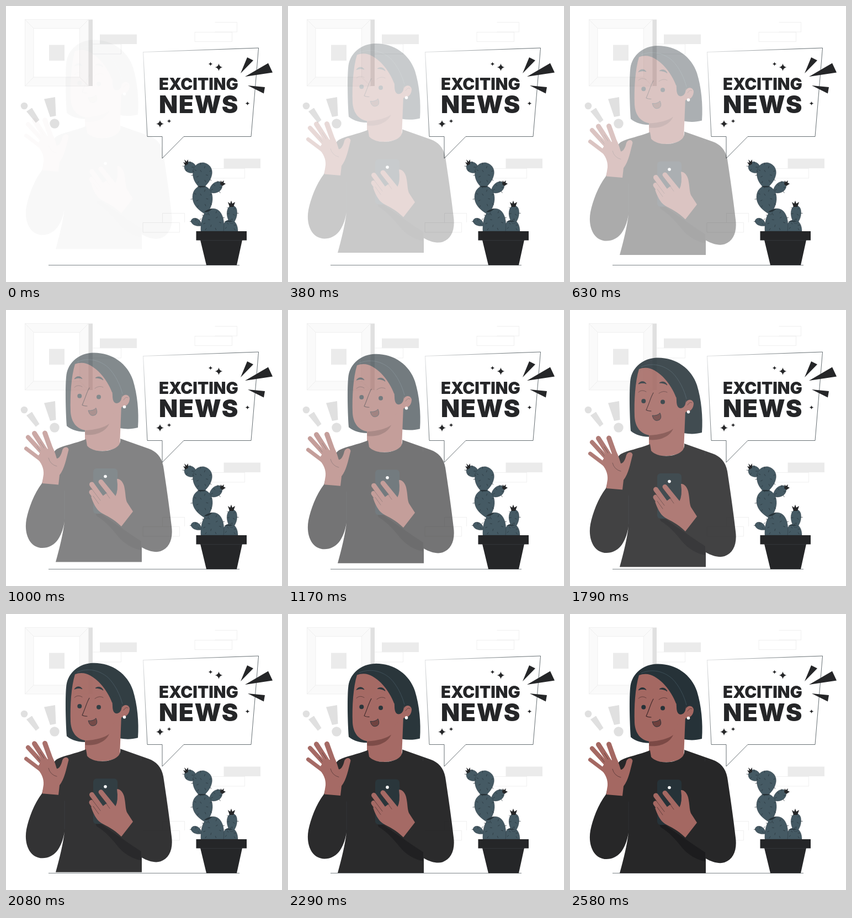
Write an HTML page that moves like this. It is 500x500 px and loops after 2.62 s.

```html
<!DOCTYPE html>
<html lang="en">
<head>
<meta charset="utf-8">
<title>Exciting news</title>
<style>
  html, body { margin: 0; width: 100%; height: 100%; overflow: hidden; background: #fff; }
  svg { display: block; width: 100%; height: 100%; }
  text { font-family: Inter, sans-serif; font-weight: 900; fill: #252628; }
  .line { fill: none; stroke: #e6e6e6; stroke-width: .6; }
  .pale { fill: #ebebeb; }
  .mark { fill: #e0e0e0; }
  .ink { fill: #252628; }
  .hair { fill: #263238; }
  .skin { fill: #a46862; }
  .finger { fill: none; stroke: #a46862; stroke-linecap: round; }
  .crease { fill: none; stroke: #3b2628; stroke-width: .6; stroke-linecap: round; }
  .pad { fill: #455a64; stroke: #263238; stroke-width: .4; }
</style>
</head>
<body>
<svg viewBox="0 0 500 500">
  <defs>
    <radialGradient id="fade" gradientUnits="userSpaceOnUse" cx="250" cy="85" r="160">
      <stop offset="0" stop-color="#263238" stop-opacity=".2"/>
      <stop offset="1" stop-color="#263238"/>
    </radialGradient>
  </defs>

  <!-- wall -->
  <path class="line" d="M142 69H208.500V87H142zM342 47.500H409.500V64.500H342zM378.500 29.500H418.500V47H378.500M366 294.500H432.500V312H366zM283.500 392V375.500H323.500V392M248 392.500H314.500V410H248z"/>
  <path class="pale" d="M170 51.500h67V69h-67zM394.500 276.500H461V294h-66.500z"/>
  <path class="mark" d="M149 24.500h8V145h-8z"/>
  <path d="M34.500 24.500H149.500V145H34.500z" fill="#fafafa" stroke="#ebebeb" stroke-width=".7"/>
  <path d="M50 40.500h83.500V129H50z" fill="#fff" stroke="#ebebeb" stroke-width=".7"/>
  <path class="line" d="M34.500 24.500L50 40.500M149.500 24.500L133.500 40.500M34.500 145L50 129M149.500 145L133.500 129"/>
  <path class="pale" d="M78 70.500h28V99H78z"/>
  <g class="mark">
    <circle cx="33" cy="181" r="6.300"/>
    <path d="M37 191L47 184.500L60.500 206.500L54 211.500zM69 168.500L89 165L90.500 199L80 201z"/>
    <circle cx="88" cy="213" r="8.700"/>
  </g>
  <path d="M77 469.500H423" stroke="#263238" stroke-width=".6"/>

  <!-- speech bubble -->
  <path d="M248.500 83.500L457.500 76L444 236.500H322L283 276V236.500H256z" fill="#fff" stroke="url(#fade)" stroke-width=".7"/>
  <text x="277" y="151.500" font-size="29.500">EXCITING</text>
  <text x="277" y="194" font-size="44.500" letter-spacing="1.500">NEWS</text>
  <path class="ink" d="M437 93L448 98.500L425 122zM475 103.500L483 120.500L433 128zM438 144L469 147L467 158.500z"/>
  <g id="stars" class="ink"></g>

  <!-- cactus -->
  <g id="cactus">
    <path class="pad" d="M392 408C391 396 397 387 406 387.500C416 388 420 398 420 408z"/>
    <path class="pad" d="M407 394C400 386 398 373 403 365C408 359 416 361 418 369C420 379 416 389 411 394z"/>
    <path class="pad" d="M354 398C346 400 337 397 335 390C336 384 343 383 348 386C352 389 354 392 354 398z"/>
    <path class="pad" d="M353 408C352 388 358 367 375 367C391 367 397 387 394 408z"/>
    <path class="pad" d="M368 335C370 324 378 317 387 318C394 321 393 331 386 336C379 340 371 340 368 335z"/>
    <path class="pad" d="M363 378C350 371 338 361 338 346C338 333 347 325 357 326C368 327 375 338 374 351C373 363 368 368 365 378z"/>
    <path class="pad" d="M344 297C341 304 332 304 326 299C320 292 324 284 332 282C341 283 346 290 344 297z"/>
    <path class="pad" d="M349 327C341 319 337 309 339 298C341 288 349 283 359 284C371 287 376 298 372 309C369 319 363 323 360 328z"/>
    <path class="hair" d="M346 327Q354 330 363 327Q354 325 346 327zM359 373Q366 375 374 367Q365 368 359 373zM395 391Q402 387 412 391Q402 390 395 391z"/>
    <path class="ink" d="M325 289L321 283L325 284L323 278L327 282L330 278L330 286zM388 323L389 316L391 319L395 316L394 320L398 322L392 326zM405 364L402 355L406 358L408 352.500L410 358L415 355L412 364z"/>
    <path id="spikes" fill="none" stroke="#263238" stroke-width=".7"/>
    <path class="ink" d="M344.500 408H436V424.500H344.500zM352 424H428L418 469.500H363z"/>
    <path d="M352 424.700H428" stroke="#43474b" stroke-width=".5"/>
  </g>

  <g id="woman">
    <path class="hair" d="M110 223C108 195 107 150 109.500 130C113 108 132 91 158 90.500C192 90 220 110 230 140C238 166 241 197 239 226C228 229 217 229 206 227L150 234C132 234 119 231 110 223z"/>
    <path class="skin" d="M143 226L143 262Q175 276 206 260L209 185L180 190z"/>
    <path class="skin" d="M125 111C118 134 116 168 117 197C118 216 128 229 145 231C170 230 186 220 195 200L211 188L210 165L192 162C184 140 163 113 141 109Q132 108 125 111z"/>
    <path class="skin" d="M209 174C211 165 222 164 224 173C224 182 218 189 210 188z"/>
    <path class="crease" d="M213 176Q217 169 221 172"/>
    <path class="hair" d="M188 150Q193 158 193 168C193 176 195 182 201 182C208 181 210 174 210 166L222 155z"/>
    <path d="M129 107C148 99 169 103 185 117C198 130 207 149 211 165" fill="none" stroke="#455a64" stroke-width=".7"/>
    <circle cx="214.500" cy="188.500" r="2.800" fill="#fff"/>
    <path d="M143.500 231C163 230 178 226 187 219C181 233 164 241 143.500 239z" fill="#7b4945"/>
    <path class="hair" d="M124 138C127 132 135 132 138 137.500C133 135.500 129 136 124 138zM162 136C167 132 174 134 176 140C172 137 167 136 162 136z" stroke="#263238" stroke-width=".8"/>
    <path class="crease" d="M124 153Q130 147 138 152M161 155Q169 149 176 153"/>
    <circle class="hair" cx="133.300" cy="168.800" r="4"/>
    <circle class="hair" cx="168" cy="170.500" r="4"/>
    <path class="crease" d="M151 154C146 162 143 175 138 185Q141 187 147 187" style="stroke-width:1.100"/>
    <path d="M149 195Q158 196 163 190.500Q167 199 162 203Q152 208 149 195z" fill="#6d403d" stroke="#263238" stroke-width=".9"/>

    <path fill="#272728" d="M145 247C125 255 105 258 92 265C84 271 78 285 72 302L65 327C51 345 41 372 37 392C32 420 44 444 66 444C87 444 101 427 106 396C104 415 97 445 90 469.500H246V443C258 450 271 453 280 450C296 444 303 428 300 405C297 378 291 335 285 296C282 279 272 269 258 264L207 246C208 252 205 258 202 260C190 271 158 272 147 259z"/>
    <path d="M160 374C177 385 203 404 245 432V448C230 446 213 436 202 422C190 407 180 396 164 386z" fill="#1c1c1e"/>
    <path d="M244.500 260V267M106 340V392" stroke="#35383a" stroke-width=".6"/>

    <path class="finger" stroke-width="7" d="M36.500 264L63 284"/>
    <path class="finger" stroke-width="8" d="M40 243.500L67 273"/>
    <path class="finger" stroke-width="9" d="M51.500 236.500L73 270M70.500 236L82 268"/>
    <path class="skin" d="M56 281C64 290 69 300 68 311L65.500 327L95 329.500L97 312C106 301 109 283 113.500 266C112 259 104 261 102 267C100 276 96 282 92 282C89 272 87 266 84 261L63 270z"/>
    <path class="crease" d="M77 281Q80 293 92 296M62 268L56 260M69 263L62 252"/>

    <rect class="hair" x="158" y="300" width="44" height="82" rx="6"/>
    <circle cx="180" cy="314.500" r="2.800" fill="#fff"/>
    <path class="finger" stroke-width="9" d="M172 324.500L196 354M155.500 329L180 363M155 343L174 370"/>
    <path class="skin" d="M201 319C206 318 212 324 214 332C217 345 216 354 219 361L230 378L209 405C195 391 182 386 172 380C163 374 158 363 154 351L171 353L182 345L198 351Q204 340 201 319z"/>
    <path class="crease" d="M167 325L188 354M153 334L171 358M158 350L168 364"/>
  </g>
</svg>
<script>
const LOOP = 2620, STEPS = 63, RISE = 30;
const byId = id => document.getElementById(id);
const woman = byId('woman');

const star = (x, y, r) =>
  `<path d="M${x} ${y - r}Q${x + r * .15} ${y - r * .15} ${x + r} ${y}` +
  `Q${x + r * .15} ${y + r * .15} ${x} ${y + r}Q${x - r * .15} ${y + r * .15} ${x - r} ${y}` +
  `Q${x - r * .15} ${y - r * .15} ${x} ${y - r}z"/>`;
byId('stars').innerHTML = [[385.5, 111, 6.8], [370.5, 105, 3.8], [279, 213.5, 6.8],
  [295.5, 208.5, 3.8], [437.5, 176.5, 3.8]].map(s => star(...s)).join('');

// Short thorns scattered over each pad by the golden angle: x, y, rx, ry, count
byId('spikes').setAttribute('d', [[356, 304, 17, 19, 11], [356, 347, 18, 20, 11],
  [374, 388, 20, 18, 11], [333, 292, 10, 9, 5], [381, 328, 11, 9, 5],
  [409, 375, 9, 13, 6], [406, 397, 12, 8, 5], [344, 391, 9, 6, 4]]
  .map(([x, y, rx, ry, count]) => Array.from({ length: count }, (_, i) => {
    const a = i * 2.4 + x, r = Math.sqrt((i + .5) / count);
    const dx = Math.cos(a), dy = Math.sin(a);
    return `M${x + rx * r * dx} ${y + ry * r * dy}l${dx * 4} ${dy * 4}`;
  }).join('')).join(''));

// cubic-bezier(0, 0, .58, 1)
function easeOut(x) {
  let lo = 0, hi = 1;
  for (let i = 0; i < 24; i++) {
    const s = (lo + hi) / 2;
    if (s * s * (1.74 - .74 * s) < x) lo = s; else hi = s;
  }
  return lo * lo * (3 - 2 * lo);
}

function draw(now) {
  const t = now % LOOP;
  const step = t < 80 ? 0 : Math.min(STEPS - 1, Math.floor((t + 4) * STEPS / LOOP));
  const p = easeOut((step + 1) / STEPS);
  woman.setAttribute('opacity', p);
  woman.setAttribute('transform', `translate(0 ${RISE * (p - 1)})`);
}

const start = performance.now();
function tick() {
  draw(performance.now() - start);
  requestAnimationFrame(tick);
}
tick();
</script>
</body>
</html>
```
